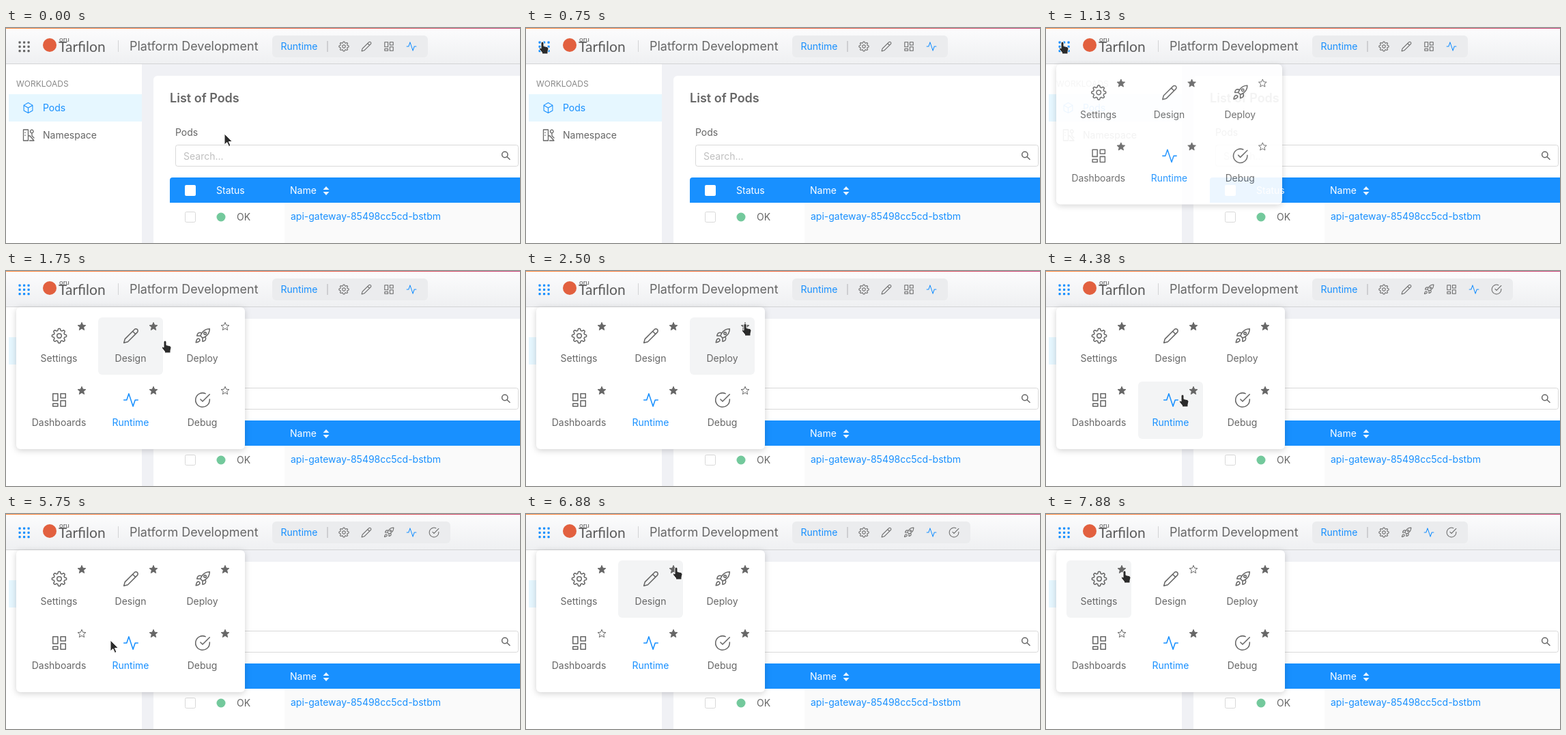
Animation, 753 px wide and 315 px high, one loop 8 s. Source, as an HTML page:

```html
<!DOCTYPE html>
<html lang="en">
<head>
<meta charset="utf-8">
<title>Pods</title>
<style>
  html, body { margin: 0; width: 100%; height: 100%; overflow: hidden; background: #fff; }
  svg { display: block; }
  text { font: 14px Inter, sans-serif; fill: #666; }
  .icon { fill: none; stroke: #666; stroke-width: 1.5; stroke-linejoin: round; stroke-linecap: round; }
  .blue { stroke: #1890ff; }
  text.blue { fill: #1890ff; stroke: none; }
  text.white { fill: #fff; }
  .title { font-size: 18px; }
  .brand { font-family: Lato, sans-serif; fill: #5c5c5c; }
  .mid { text-anchor: middle; }
  .star { fill: none; stroke: #666; stroke-linejoin: round; }
  .star.on { fill: #666; }
  .pointer { fill: #2b2b2b; stroke: #fff; stroke-linejoin: round; }
  #panel { filter: drop-shadow(0 2px 5px rgba(0, 0, 0, .18)); }
  #menu { transform-origin: 15px 53px; }
</style>
</head>
<body>
<svg width="753" height="315" viewBox="0 0 753 315">
  <defs>
    <linearGradient id="bar" x2="0" y2="1"><stop stop-color="#fcfcfd"/><stop offset="1" stop-color="#eff0f2"/></linearGradient>
    <linearGradient id="stripe"><stop stop-color="#ff8a3c"/><stop offset=".55" stop-color="#ef6540"/><stop offset="1" stop-color="#c8457a"/></linearGradient>
    <g id="icons"></g>
  </defs>

  <rect x="199" y="53" width="554" height="262" fill="#f0f1f5"/>
  <rect width="753" height="52" fill="url(#bar)"/>
  <rect y="52" width="753" height="1" fill="#d3d4d6"/>
  <rect width="753" height="1" fill="url(#stripe)"/>
  <g id="dots"></g>
  <circle cx="64" cy="25" r="10" fill="#e2603f"/>
  <text class="brand" x="78" y="20" style="font-size:10px">oru</text>
  <text class="brand" x="77" y="35" style="font-size:21px">Tarfilon</text>
  <path d="M164.5 18V35" stroke="#d2d3d5"/>
  <text class="title" x="181" y="33">Platform Development</text>
  <rect id="pill" x="390" y="11" height="32" rx="6" fill="#ebecee"/>
  <text class="blue" x="402.5" y="32">Runtime</text>
  <path d="M471 19V35" stroke="#c4c5c7" stroke-width="1.5"/>
  <g id="favourites"></g>

  <text x="15" y="86" style="font-size:12px;fill:#888">WORKLOADS</text>
  <rect x="4" y="97" width="195" height="40" fill="#e6f7ff"/>
  <path class="icon blue" transform="translate(24 108.500) scale(.71)" d="M12 1.500 21 6.500V17.500L12 22.500 3 17.500V6.500ZM3.500 7 12 12 20.500 7M12 12V22"/>
  <text class="blue" x="54" y="122">Pods</text>
  <path class="icon" style="stroke-width:1.300" d="M25.500 149H32.500V165H25.500ZM28 153V153.500M28 157V157.500M32.500 158H35L41 165H34.500M35.500 151.500a2.300 2.300 0 1 1 4.600 0 2.300 2.300 0 1 1-4.600 0M38 154V158L41 161"/>
  <text x="54" y="162">Namespace</text>

  <path d="M753 70H222a6 6 0 0 0-6 6V315H753Z" fill="#fff"/>
  <text class="title" x="240" y="109" style="font-weight:600">List of Pods</text>
  <text x="248" y="158">Pods</text>
  <rect x="248.500" y="171.500" width="502" height="31" rx="3" fill="#fff" stroke="#d9d9d9"/>
  <text x="260" y="193" style="fill:#bfbfbf">Search...</text>
  <path class="icon" d="M735 185.500a4.200 4.200 0 1 1-8.400 0 4.200 4.200 0 1 1 8.400 0M734 188.800 738 192.500"/>
  <path d="M753 219H244a4 4 0 0 0-4 4V256H753Z" fill="#1890ff"/>
  <rect x="262" y="230" width="16" height="16" rx="2" fill="#fff"/>
  <text class="white" x="308" y="243">Status</text>
  <text class="white" x="416" y="243">Name</text>
  <path d="M464.500 237 469 232 473.500 237ZM464.500 240 469 245 473.500 240Z" fill="#e8f4ff"/>
  <rect x="408" y="256" width="345" height="59" fill="#fafafa"/>
  <rect x="262.500" y="269.500" width="15" height="15" rx="2" fill="#fff" stroke="#d9d9d9"/>
  <circle cx="315" cy="277" r="6.500" fill="#73c99c"/>
  <text x="338" y="282">OK</text>
  <text class="blue" x="417" y="281">api-gateway-85498cc5cd-bstbm</text>

  <g id="menu">
    <rect id="panel" x="15" y="53" width="335" height="208" rx="6" fill="#fff"/>
    <g id="tiles"></g>
  </g>
  <path id="cursor" class="pointer"/>
</svg>
<script>
const $ = id => document.getElementById(id);
const range = n => [...Array(n).keys()];
const polar = (n, radius, cx = 0, cy = 0) => 'M' + range(n).map(i => {
  const a = i / n * 2 * Math.PI, r = radius(i, a);
  return (cx + r * Math.sin(a)).toFixed(2) + ' ' + (cy - r * Math.cos(a)).toFixed(2);
}).join('L') + 'Z';
const ring = (x, y, r) => `M${x - r} ${y}a${r} ${r} 0 1 1 ${2 * r} 0a${r} ${r} 0 1 1 ${-2 * r} 0`;

const gear = polar(96, (i, a) => 9 + 1.3 * Math.max(-1, Math.min(1, 1.6 * Math.cos(8 * a))), 12, 12) + ring(12, 12, 3.2);
const star = polar(10, i => i % 2 ? 2.8 : 6.2);
const items = [
  ['Settings', gear],
  ['Design', 'M17 3a2.83 2.83 0 1 1 4 4L7.5 20.5 2 22l1.5-5.5ZM14.5 5.500l4 4'],
  ['Deploy', 'M4.5 16.5c-1.5 1.26-2 5-2 5s3.74-.5 5-2c.71-.84.7-2.13-.09-2.91a2.18 2.18 0 0 0-2.91-.09ZM12 15l-3-3a22 22 0 0 1 2-3.95A12.88 12.88 0 0 1 22 2c0 2.72-.78 7.5-6 11a22.35 22.35 0 0 1-4 2ZM9 12H4s.55-3.03 2-4c1.62-1.08 5 0 5 0M12 15v5s3.03-.55 4-2c1.08-1.62 0-5 0-5' + ring(15.5, 8.5, 1.7)],
  ['Dashboards', 'M3 3h7v10H3ZM14 3h7v6h-7ZM3 17h7v4H3ZM14 13h7v8h-7Z'],
  ['Runtime', 'M22 12h-4l-3 9L9 3l-3 9H2'],
  ['Debug', 'M22 11.08V12a10 10 0 1 1-5.93-9.14M22 4 12 14.01l-3-3']
];
const RUNTIME = 4, APPS = 6, NONE = -1;
$('icons').innerHTML = items.map(([, d], i) => `<path id="icon${i}" d="${d}"/>`).join('');

const arrow = 'M0 0V16L3.8 12.6 6.5 18.5 9 17.3 6.4 11.6H11.5Z';
const hand = 'M-2 2a2 2 0 0 1 4 0V6.500L6.500 7.500Q9 8 9 10.500L8 14.500V18H-.5V16L-4.500 11Q-5 9-3.500 9L-2 10Z';

// Star clicks: [tick, item]; the toolbar follows two ticks later.
const clicks = [[19, 2], [31, 5], [38, 3], [57, 1]];
const starred = tick => items.map((_, i) =>
  [0, 1, 3, RUNTIME].includes(i) !== clicks.some(([t, item]) => item === i && tick >= t));

// Pointer path: [tick, x, y, hovered item].
const path = [
  [0, 320, 155, NONE], [1, 300, 146, NONE], [3, 160, 82, NONE], [5, 42, 28, NONE], [6, 24, 20, APPS],
  [10, 24, 20, APPS], [11, 45, 35, NONE], [12, 105, 72, 0], [13, 180, 96, 1], [14, 233, 102, 1],
  [15, 262, 97, 2], [17, 316, 81, 2], [18, 321, 77, 2], [22, 321, 77, 2], [24, 327, 134, 2],
  [25, 327, 134, 2], [26, 327, 157, NONE], [27, 324, 167, 5], [28, 321, 171, 5], [33, 321, 171, 5],
  [34, 270, 178, 5], [35, 200, 181, RUNTIME], [36, 130, 176, 3], [37, 110, 171, 3], [45, 110, 171, 3],
  [46, 153, 185, NONE], [47, 172, 182, RUNTIME], [49, 190, 165, RUNTIME], [50, 196, 145, 1], [52, 201, 117, 1],
  [54, 216, 84, 1], [55, 220, 78, 1], [59, 220, 78, 1], [61, 165, 86, 1], [62, 130, 85, NONE], [63, 115, 83, 0]
];
function pointer(tick) {
  const k = path.findLastIndex(p => p[0] <= tick);
  const [t0, x0, y0, hover] = path[k], [t1, x1, y1] = path[k + 1] || [t0 + 1, x0, y0];
  const f = (tick - t0) / (t1 - t0);
  return [x0 + (x1 - x0) * f, y0 + (y1 - y0) * f, hover];
}

const icon = (i, x, y, scale) =>
  `<use href="#icon${i}" class="icon ${i === RUNTIME ? 'blue' : ''}" transform="translate(${x} ${y}) scale(${scale}) translate(-12 -12)"/>`;

function tile([label], i, on, hovered) {
  const x = 77.5 + i % 3 * 105, y = 68 + Math.floor(i / 3) * 94;
  return (hovered ? `<rect x="${x - 47.5}" y="${y}" width="95" height="84" rx="6" fill="#f3f4f5"/>` : '') +
    icon(i, x + .5, y + 27, 1.03) +
    `<text class="mid ${i === RUNTIME ? 'blue' : ''}" x="${x}" y="${y + 65}">${label}</text>` +
    `<path class="star ${on ? 'on' : ''}" transform="translate(${x + 33.5} ${y + 13.5})" d="${star}"/>`;
}

function draw(tick) {
  const [x, y, hover] = pointer(tick), stars = starred(tick);
  const shown = range(items.length).filter(i => starred(tick - 2)[i]);
  $('favourites').innerHTML = shown.map((i, n) => icon(i, 495 + 33 * n, 27, .69)).join('');
  $('pill').setAttribute('width', 96 + 33 * shown.length);
  $('dots').innerHTML = range(9).map(i =>
    `<rect x="${18.5 + i % 3 * 6.5}" y="${19.5 + Math.floor(i / 3) * 6.3}" width="3.2" height="3.2" rx=".8" fill="${tick < 6 ? '#666' : '#1890ff'}"/>`).join('');
  $('tiles').innerHTML = items.map((item, i) => tile(item, i, stars[i], hover === i)).join('');
  $('menu').style.opacity = tick < 9 ? 0 : tick === 9 ? .92 : 1;
  $('menu').style.transform = tick === 9 ? 'scale(.988)' : 'none';
  $('cursor').setAttribute('d', hover === NONE ? arrow : hand);
  $('cursor').setAttribute('transform', `translate(${x} ${y})`);
}

let last = NONE;
function frame() {
  const tick = Math.floor(performance.now() % 8000 / 125);
  if (tick !== last) draw(last = tick);
  requestAnimationFrame(frame);
}
frame();
</script>
</body>
</html>
```
